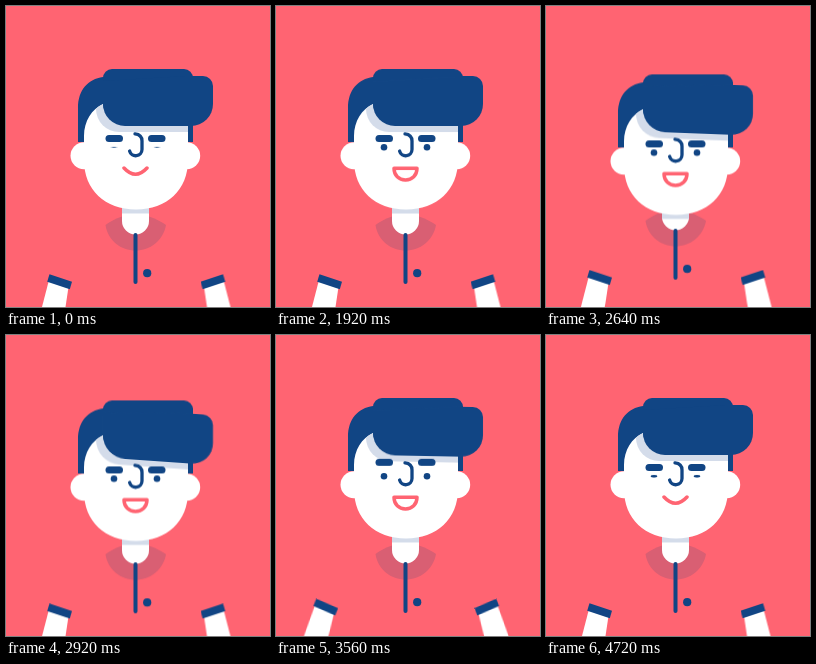
Animation of 264x301 px, one loop 4760 ms. Source, as an HTML page:

```html
<!DOCTYPE html>
<html lang="en">
<head>
<meta charset="utf-8">
<title>Shrugging character</title>
<style>
  :root { --pink: #ff6472; --navy: #114584; --shade: #d4dcea; --loop: 4760ms; }
  html, body { margin: 0; width: 100%; height: 100%; overflow: hidden; background: var(--pink); }
  svg { display: block; width: 100%; height: 100%; }

  .navy { fill: var(--navy); }
  .shade { fill: var(--shade); }
  .white { fill: #fff; }
  .line { stroke: var(--navy); stroke-linecap: round; fill: none; }
  .lips { stroke: var(--pink); stroke-width: 3.5; stroke-linecap: round; stroke-linejoin: round; fill: #fff; }

  .head, .body, .arm, .fringe, .brows, .eyes, .smile, .laugh {
    animation: var(--loop) ease-in-out infinite;
  }
  .head { animation-name: nod; }
  .body { animation-name: shrug; }
  .arm { animation-name: swing; transform-origin: 92px 231px; }
  .fringe { animation-name: flop; transform-origin: 97px 98px; }
  .brows { animation-name: lift; }
  .eyes { animation-name: blink; animation-timing-function: linear; transform-origin: 129px 141.3px; }
  .smile { animation-name: smile; animation-timing-function: step-end; }
  .laugh { animation-name: laugh; animation-timing-function: step-end; }

  @keyframes nod {
    0%, 40% { transform: translateY(0); }
    48.74% { transform: translateY(5px); }
    55.46% { transform: translateY(5.4px); animation-timing-function: ease-in; }
    61.34% { transform: translateY(2.5px); animation-timing-function: ease-out; }
    65.55% { transform: translateY(-3px); }
    74.79%, 100% { transform: translateY(0); }
  }
  @keyframes shrug {
    0%, 40% { transform: translateY(0); }
    48.74% { transform: translateY(-4px); }
    55.46% { transform: translateY(-4.3px); }
    61.34% { transform: translateY(.3px); }
    64.71% { transform: translateY(1px); }
    71.43%, 100% { transform: translateY(0); }
  }
  @keyframes swing {
    0%, 62% { transform: rotate(0); }
    68.07% { transform: rotate(5.8deg); }
    74.79% { transform: rotate(5.2deg); }
    88.24% { transform: rotate(5deg); }
    98.32%, 100% { transform: rotate(0); }
  }
  @keyframes flop {
    0%, 40% { transform: skewY(0); }
    48.74% { transform: skewY(2.6deg); }
    55.46% { transform: skewY(2.2deg); }
    61.34% { transform: skewY(4deg); }
    69% { transform: skewY(-.6deg); }
    74.79% { transform: skewY(1.1deg); }
    86%, 100% { transform: skewY(0); }
  }
  @keyframes lift {
    0%, 63.03% { transform: translateY(0); }
    68.07% { transform: translateY(-5.3px); }
    81.93% { transform: translateY(-5px); }
    86.55%, 100% { transform: translateY(0); }
  }
  @keyframes blink {
    0%, 100% { transform: scaleY(.12); }
    1.68%, 97.48% { transform: scaleY(1); }
  }
  @keyframes smile {
    0%, 84.03% { visibility: visible; }
    40.3% { visibility: hidden; }
  }
  @keyframes laugh {
    0%, 84.03% { visibility: hidden; }
    40.3% { visibility: visible; }
  }
</style>
</head>
<body>
<svg viewBox="0 0 264 301" preserveAspectRatio="none">
  <defs>
    <path id="face" d="M78 138V130C78 115 86 103 97 98L110 90H182V154C182 184 161 203.5 130 203.5S78 184 78 154Z"/>
    <clipPath id="faceClip"><use href="#face"/></clipPath>
    <g id="arm">
      <path class="white" d="M43 274L36 301L30 325H55L59.5 301L62.5 281Z"/>
      <path class="navy" d="M43.5 268.2L66 275.7L63.8 283.2L41.2 275.8Z"/>
    </g>
  </defs>

  <g class="body">
    <path fill="#d95f73" d="M116 210.5Q106 214 99.5 219C102 235 115 244.5 129.5 244.5S157 235 160 219Q153 214 143 210.5Z"/>
    <path class="white" d="M116 190H143V215A13.5 13.5 0 0 1 116 215Z"/>
    <path class="line" stroke-width="4" d="M129.5 229V276"/>
    <circle class="navy" cx="141.2" cy="267.2" r="4.1"/>
    <use href="#arm" class="arm"/>
    <g transform="translate(260.5) scale(-1 1)"><use href="#arm" class="arm"/></g>
  </g>

  <g class="head">
    <path class="shade" d="M116 192H143V207.5H116Z"/>
    <!-- hair behind the face -->
    <path class="navy" d="M72 138V102C72 84 82 73 97 71H187V136H72Z"/>
    <use href="#face" class="white"/>
    <circle class="white" cx="78" cy="149.7" r="13.5"/>
    <circle class="white" cx="180.7" cy="149.7" r="13.5"/>
    <g clip-path="url(#faceClip)">
      <path class="shade fringe" d="M90 90V103A23 23 0 0 0 113 126H190V90Z"/>
    </g>
    <rect class="navy" x="97" y="63" width="90" height="45" rx="9"/>
    <path class="navy fringe" d="M97 75V98A22 22 0 0 0 119 120H185A22 22 0 0 0 207 98V80A10 10 0 0 0 197 70H180Z"/>

    <g class="brows navy">
      <rect x="99.5" y="129" width="17.5" height="7" rx="3.5"/>
      <rect x="142" y="129" width="17.5" height="7" rx="3.5"/>
    </g>
    <g class="eyes navy">
      <circle cx="108" cy="141.3" r="3.3"/>
      <circle cx="151" cy="141.3" r="3.3"/>
    </g>
    <path class="line" stroke-width="3.3" d="M129 127.8Q136 128.5 136 135V143.5A6.3 6.3 0 0 1 123.6 145"/>
    <path class="lips smile" d="M118 162Q129.5 174.5 141 162"/>
    <path class="lips laugh" d="M118 162.3H141C141 169.5 136 174 129.5 174S118 169.5 118 162.3Z"/>
  </g>
</svg>
</body>
</html>
```
